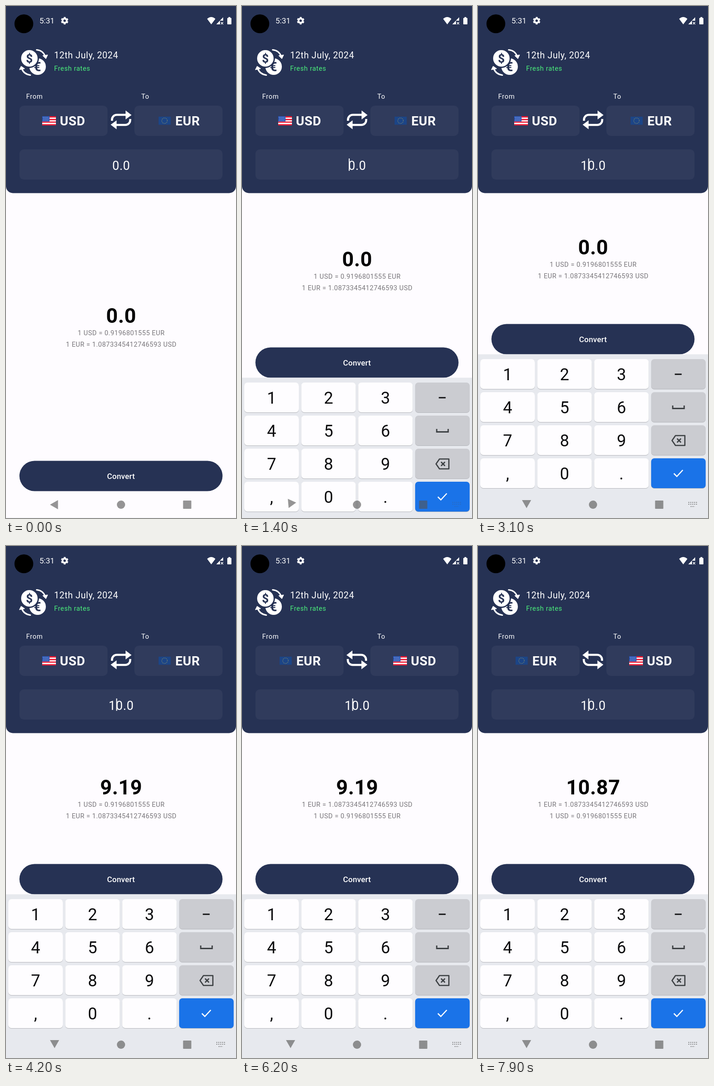
These frames come from a looping animation (502x1115 px, 8000 ms). An HTML page:

```html
<!DOCTYPE html>
<html lang="en">
<head>
<meta charset="utf-8">
<title>Currency converter</title>
<style>
  html, body { margin: 0; width: 100%; height: 100%; overflow: hidden; background: #fefcff; }
  svg { display: block; width: 502px; height: 1115px; font-family: Roboto, sans-serif; }
  .mid { text-anchor: middle; }
  .small { font-size: 14.64px; letter-spacing: .61px; }
  .rate { font-size: 14.5px; letter-spacing: .49px; fill: #78767a; }
  .code { font-size: 28px; font-weight: 700; letter-spacing: .6px; }
  .line { fill: none; stroke: #fff; }
</style>
</head>
<body>
<svg viewBox="0 0 502 1115">
  <rect width="502" height="1115" fill="#fefcff"/>

  <g fill="#fff">
    <path d="M0 0H502V392.4a15 15 0 0 1-15 15H15a15 15 0 0 1-15-15Z" fill="#263254"/>
    <circle cx="39" cy="38.7" r="20.5" fill="#000"/>
    <text x="73" y="38" font-size="17">5:31</text>
    <g transform="translate(128 32) rotate(13.6)" class="line">
      <circle r="4.6" stroke-width="3.8"/>
      <circle r="7" stroke-width="2.4" stroke-dasharray="4 3.33"/>
    </g>
    <path d="M448 40 439 28Q448 20 457 28ZM459 40 474 24.5V32H467V40ZM485.5 26V24h4v2h1.5a1 1 0 0 1 1 1V39a1 1 0 0 1-1 1H484a1 1 0 0 1-1-1V27a1 1 0 0 1 1-1Z"/>
    <path d="m469 35 5 5m0-5-5 5" class="line" stroke-width="1.4"/>

    <g id="coins" font-weight="700" text-anchor="middle">
      <circle cx="69" cy="132" r="18"/>
      <text x="68.5" y="142" font-size="28" fill="#263254">€</text>
      <circle cx="51" cy="114" r="19.5" stroke="#263254" stroke-width="3"/>
      <text x="51" y="123" font-size="26" fill="#263254">$</text>
      <path d="M67 95.5Q81 97 85 109M53 150.5Q38 148 34.5 136" class="line" stroke-width="3.2" stroke-linecap="round"/>
      <path d="M80 108 91 106.5 87 115ZM29 139 33 131 41 136.5Z" stroke="#fff" stroke-linejoin="round"/>
    </g>
    <text x="104.9" y="114" font-size="19.52" letter-spacing=".61">12th July, 2024</text>
    <text x="104.9" y="141" class="small" fill="#4bf07c">Fresh rates</text>
    <text x="44" y="202" class="small">From</text>
    <text x="295.2" y="202" class="small">To</text>

    <g fill="#303b5c">
      <rect x="29.3" y="217" width="192.4" height="65.9" rx="9.8"/>
      <rect x="280.2" y="217" width="192.4" height="65.9" rx="9.8"/>
      <rect x="29.3" y="312.2" width="443.3" height="65.9" rx="9.8"/>
    </g>
    <g id="usd">
      <rect x="79" y="240" width="30" height="20" rx="1"/>
      <path d="M79 241.5h30m-30 5.7h30m-30 5.7h30m-30 5.7h30" stroke="#ec1c36" stroke-width="2.9"/>
      <rect x="79" y="240" width="16" height="11.5" fill="#2b56b5"/>
      <path d="M81 242.5h13m-12 3h11m-12 3h13" class="line" stroke-width="1.1" stroke-dasharray="1.1 2.1"/>
      <text x="117.5" y="259.5" class="code">USD</text>
    </g>
    <g id="eur">
      <rect x="82" y="241" width="26.5" height="17.5" fill="#1c4587"/>
      <circle cx="95" cy="249.8" r="6" fill="none" stroke="#a9a45c" stroke-width="1.3" stroke-dasharray="1.1 2.04"/>
      <text x="118.5" y="259.5" class="code">EUR</text>
    </g>
    <g id="swap">
      <g id="arrow">
        <path d="M231.3 250V247.5a10.5 10.5 0 0 1 10.5-10.5H263" class="line" stroke-width="4.5"/>
        <path d="M261 227.5 274 237.5 261 247Z"/>
      </g>
      <use href="#arrow" transform="rotate(180 251.2 248)"/>
    </g>
    <text id="amount" class="mid" x="251.5" y="357" font-size="26.85" letter-spacing=".61"></text>
    <rect id="caret" y="332" width="2" height="27"/>
  </g>

  <g id="result" class="mid">
    <text id="total" x="251.5" y="541" font-size="44.5" font-weight="700" letter-spacing=".6"></text>
    <text id="rate1" class="rate" x="251.5" y="568.2"></text>
    <text id="rate2" class="rate" x="251.5" y="593.2"></text>
  </g>
  <g id="button">
    <rect x="29.3" y="692.5" width="443.3" height="65.9" rx="32.95" fill="#263254"/>
    <text class="mid" x="251" y="731.5" font-size="17.08" font-weight="500" letter-spacing=".12" fill="#fff">Convert</text>
  </g>

  <g id="keyboard">
    <rect y="758.5" width="502" height="400" fill="#e7e9ee"/>
    <g id="keys" class="mid" font-size="36" fill="#0c0c0e"></g>
    <g fill="none" stroke="#3c4043" stroke-width="2.8">
      <path d="M429.5 802h15" stroke="#0c0c0e"/>
      <path d="M425 870v6.5h25v-6.5"/>
      <path d="M431 935.5H451.5V957H431L423.5 946.2ZM434.5 942l8.5 8.5m0-8.5-8.5 8.5" stroke-linejoin="round" stroke-width="2.6"/>
      <path d="m427.5 1018 6.5 6.5 13-14" stroke="#fff" stroke-width="2.5"/>
    </g>
  </g>

  <g fill="#555" opacity=".62">
    <path id="back" d="M-10 0 7.5-10V10Z"/>
    <circle cx="251" cy="1086" r="9"/>
    <rect x="386.5" y="1077" width="18" height="18" rx="1"/>
    <path id="imeIcon" d="M459 1081h19m-19 4h19m-14 5h9" fill="none" stroke="#555" stroke-width="2" stroke-dasharray="2.2 2"/>
  </g>
</svg>
<script>
const LOOP = 8000;
const FOCUS = 1200, TYPE = 2750, CONVERT = 3700, SWAP = 5100, CONVERT_AGAIN = 7000;
const RATES = ['1 USD = 0.9196801555 EUR', '1 EUR = 1.0873345412746593 USD'];

const $ = id => document.getElementById(id);
const progress = (t, start, length) => Math.min(1, Math.max(0, (t - start) / length));
const move = (id, x, y = 0, extra = '') => $(id).setAttribute('transform', `translate(${x} ${y}) ${extra}`);
const write = (id, text) => { if ($(id).textContent !== text) $(id).textContent = text; };

$('keys').innerHTML = [...'123-456_789<,0.!'].map((key, i) => {
  const column = i % 4, row = i >> 2;
  const x = 5 + column * 124.3, y = 769 + row * 72;
  const fill = key === '!' ? '#1a73e8' : column === 3 ? '#cbccd1' : '#fefdff';
  const box = (dy, color) => `<rect x="${x}" y="${y + dy}" width="119" height="65" rx="7" fill="${color}"/>`;
  const label = column < 3 ? `<text x="${x + 59.5}" y="${y + 46.3}">${key}</text>` : '';
  return box(1, '#b4b6bb') + box(0, fill) + label;
}).join('');

function draw(t) {
  // The content is pushed up by the keyboard, which first covers the navigation bar.
  const hidden = Math.round(356 * (1 - progress(t, 1260, 295)) ** 3);
  const shift = Math.min(298, hidden);
  move('keyboard', 0, hidden);
  move('button', 0, shift);
  move('result', 0, shift / 2);

  const p = progress(t, 1270, 200), turn = p * p * (3 - 2 * p);
  move('back', 106, 1086 - 2.5 * turn, `rotate(${-90 * turn})`);
  $('imeIcon').setAttribute('opacity', progress(t, 1330, 200));

  const typed = t >= TYPE, swapped = t >= SWAP;
  write('amount', typed ? '10.0' : '0.0');
  const caretOn = t >= FOCUS && (t - (typed ? TYPE : FOCUS)) % 1000 < 500;
  $('caret').setAttribute('x', typed ? 240.5 : 233);
  $('caret').setAttribute('opacity', caretOn ? 1 : 0);

  write('total', t >= CONVERT_AGAIN ? '10.87' : t >= CONVERT ? '9.19' : '0.0');
  write('rate1', RATES[+swapped]);
  write('rate2', RATES[+!swapped]);
  move('usd', swapped ? 251 : 0);
  move('eur', swapped ? 0 : 251);
  const flip = Math.cos(Math.PI * progress(t, SWAP, 300));
  move('swap', 251 - 251 * flip, 0, `scale(${flip} 1)`);
}

const start = performance.now();
function tick() {
  draw((performance.now() - start) % LOOP);
  requestAnimationFrame(tick);
}
tick();
</script>
</body>
</html>
```
